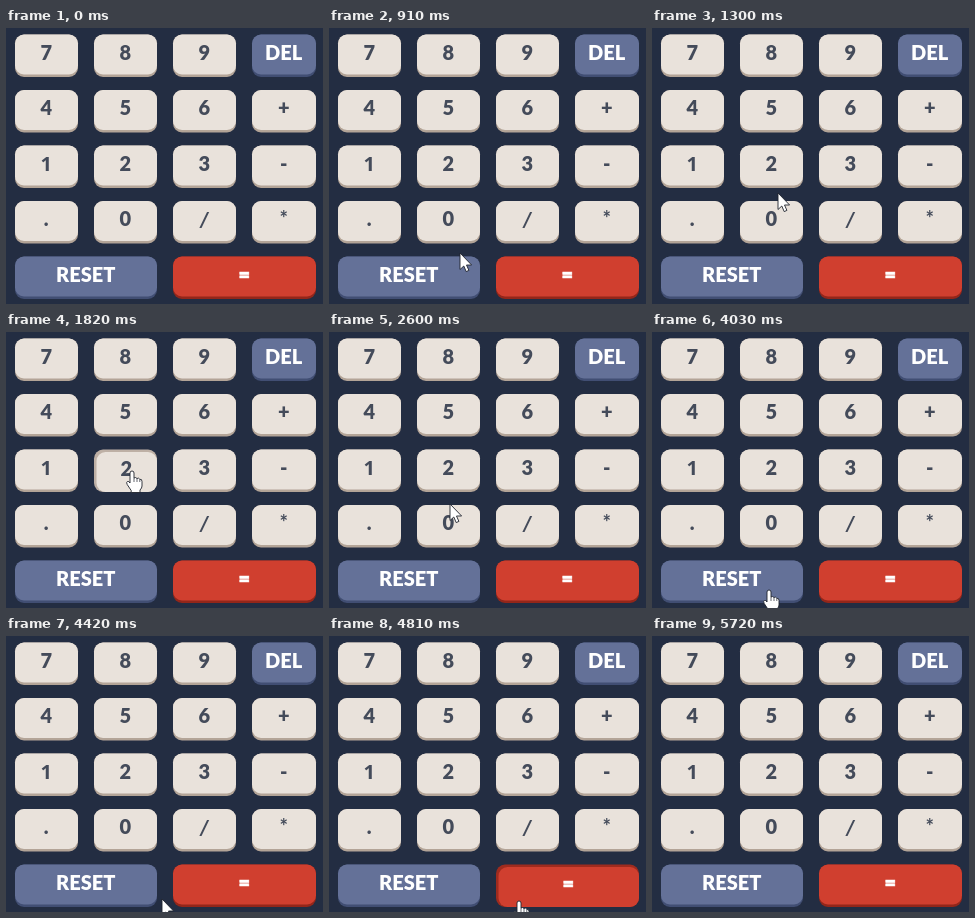
These frames come from a looping animation (317x276 px, 6240 ms). An HTML page:

```html
<!DOCTYPE html>
<html lang="en">
<head>
<meta charset="utf-8">
<title>Calculator keypad</title>
<style>
  html, body { margin: 0; width: 100%; height: 100%; overflow: hidden; background: #232d42; }
  svg { display: block; width: 100%; height: 100%; }
  text { font: 900 20px Lato, "Open Sans", sans-serif; text-anchor: middle; }
  .one { font: 700 20px "Open Sans", sans-serif; }
  .slash { font: 700 20px "DejaVu Sans Mono", monospace; }
  .thin { font-weight: 700; }
  .cream { --face: #e9e2db; --shade: #b3a497; --ink: #444b5a; }
  .blue { --face: #647198; --shade: #414e73; --ink: #fff; }
  .red { --face: #d03f2f; --shade: #93261a; --ink: #fff; }
  .shade { fill: var(--shade); }
  .face { fill: var(--face); }
  .key text { fill: var(--ink); }
  .red text { stroke: var(--ink); stroke-width: .6; }
  .pressed .shade { fill: color-mix(in srgb, var(--shade) 80%, var(--face)); }
  .cursor { fill: #fff; stroke: #20242e; stroke-width: .9; stroke-linejoin: round; }
</style>
</head>
<body>
<svg viewBox="0 0 317 276" preserveAspectRatio="none">
  <g id="keys"></g>
  <g id="pointer" class="cursor" visibility="hidden">
    <path id="arrow" d="M0 0V16.5L3.8 13L6.2 18.6L8.9 17.4L6.5 12H11.6Z"/>
    <g id="hand">
      <path d="M-2 12V2Q-2 0 0 0T2 2V7Q3.5 5.8 5 7.5Q6.6 6.4 7.8 8.3Q10 7.8 10 10.5V15Q10 17 8 19V21.5H-.8V19.5L-4.8 13.5Q-6 11.2 -4.6 10.5T-2 12Z"/>
      <path d="M2 7V11M5 7.8V11M7.8 8.6V11" fill="none" stroke-width=".7"/>
    </g>
  </g>
</svg>
<script>
const LOOP = 6240, STEP = 130;
const SVG = "http://www.w3.org/2000/svg";
const $ = id => document.getElementById(id);

function add(parent, tag, attrs, text = "") {
  const node = document.createElementNS(SVG, tag);
  for (const name in attrs) node.setAttribute(name, attrs[name]);
  node.textContent = text;
  return parent.appendChild(node);
}

const keys = {};
const glyphStyle = { "1": "one", "/": "slash", "*": "thin" };

function addKey(label, x, row, w = 63, color = "cream") {
  const y = 6.5 + row * 55.5, h = 42.5;
  const group = add($("keys"), "g", { class: "key " + color });
  add(group, "rect", { class: "shade", x, y, width: w, height: h, rx: 9 });
  const face = add(group, "rect", { class: "face", x, y, width: w, height: h - 2.5, rx: 9 });
  const text = add(group, "text", {
    x: x + w / 2 - 0.3, y: y + 25, class: glyphStyle[label] || ""
  }, label);
  keys[label] = { x, y, w, h, group, face, text };
}

["789", "456+", "123-", ".0/*"].forEach((row, r) =>
  [...row].forEach((label, c) => addKey(label, 9 + c * 79, r, c === 3 ? 64 : 63)));
addKey("DEL", 246, 0, 64, "blue");
addKey("RESET", 9, 4, 142, "blue");
addKey("=", 167, 4, 143, "red");

function setPressed({ x, y, w, h, group, face, text }, on) {
  const edge = on ? 2.5 : 0;
  group.classList.toggle("pressed", on);
  face.setAttribute("x", x + edge);
  face.setAttribute("y", y + edge);
  face.setAttribute("width", w - edge);
  face.setAttribute("height", h - 2.5);
  text.setAttribute("transform", on ? "translate(1 1.5)" : "");
}

// Pointer tip as [ms, x, y]; straight moves between stops.
const path = [
  [650, 146, 268], [910, 131, 225], [1300, 126, 165], [1690, 126, 139],
  [2340, 126, 139], [2600, 121, 172], [2990, 111, 240], [3120, 110, 249],
  [3380, 112, 254], [3900, 112, 254], [4030, 117, 258], [4420, 156, 263],
  [4810, 190, 265], [5460, 190, 265], [5590, 189, 273], [5720, 188, 290]
];
const presses = [["2", 1820, 2080], ["RESET", 3380, 3640], ["=", 4810, 5330]];

function tipAt(t) {
  const i = path.findIndex(stop => stop[0] > t);
  if (i < 1) return null;
  const [t0, x0, y0] = path[i - 1], [t1, x1, y1] = path[i];
  const k = (t - t0) / (t1 - t0);
  return [x0 + (x1 - x0) * k, y0 + (y1 - y0) * k].map(Math.round);
}

const overKey = (px, py) => Object.values(keys).some(({ x, y, w, h }) =>
  px >= x && px < x + w && py >= y && py < y + h + 4);

function draw(t) {
  for (const [label, from, to] of presses) setPressed(keys[label], t >= from && t < to);
  const tip = tipAt(t);
  $("pointer").setAttribute("visibility", tip ? "visible" : "hidden");
  if (!tip) return;
  // Row gaps and the strip along a key's top edge keep the plain arrow.
  const hover = overKey(...tip);
  $("pointer").setAttribute("transform", `translate(${tip})`);
  $("hand").style.display = hover ? "" : "none";
  $("arrow").style.display = hover ? "none" : "";
}

const start = performance.now();
function tick() {
  const t = (performance.now() - start) % LOOP;
  draw(Math.floor(t / STEP) * STEP);
  requestAnimationFrame(tick);
}
tick();
</script>
</body>
</html>
```
